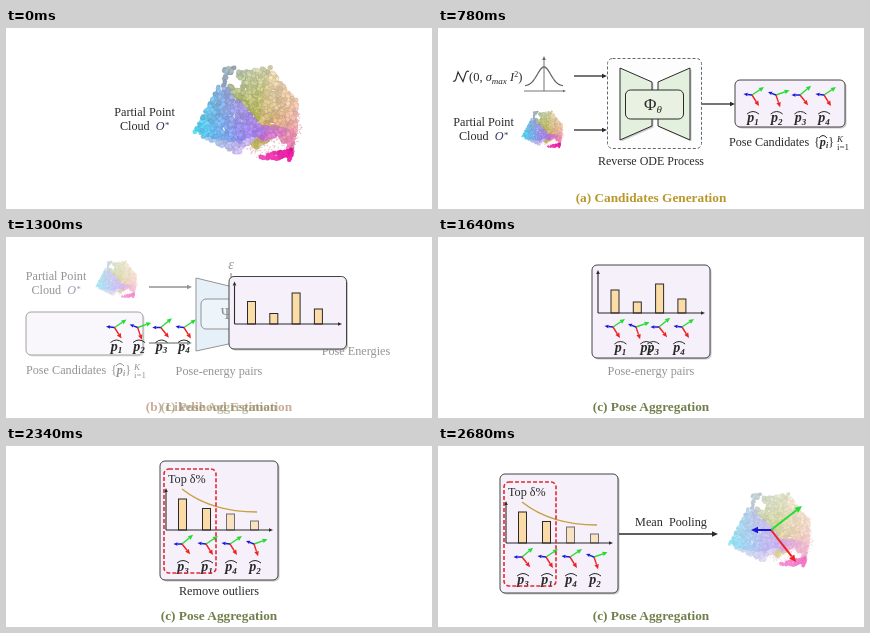
Write an HTML page that moves like this. It is 426 px wide and 181 px high and loops after 2780 ms.

```html
<!DOCTYPE html>
<html lang="en">
<head>
<meta charset="utf-8">
<title>Pose estimation pipeline</title>
<style>
  html, body { margin: 0; width: 100%; height: 100%; overflow: hidden; background: #fff; }
  svg { display: block; width: 100vw; height: 100vh; font: 12.2px "Liberation Serif", "Times New Roman", serif; }
</style>
</head>
<body>
<svg viewBox="0 0 426 181">
  <defs><g id="cloud"></g></defs>
  <g id="scene"></g>
</svg>
<script>
const LOOP = 2780, STEPS = 32;
const INK = '#2a2a2a', PANEL = '#f5f0f9';
const scene = document.getElementById('scene');

const mix = (a, b, t) => a + (b - a) * t;
const mixAll = (a, b, t) => a.map((v, i) => mix(v, b[i], t));
const ease = (k, from, to) => {
  const t = Math.min(1, Math.max(0, (k - from) / (to - from)));
  return t * t * (3 - 2 * t);
};
const startOf = step => 20 * Math.round(step * 13 / 3);

// Drawing helpers, all returning SVG markup
const fade = (opacity, body) => opacity > 0.01 ? `<g opacity="${opacity}">${body}</g>` : '';
const move = (x, y, body) => `<g transform="translate(${x} ${y})">${body}</g>`;
const path = (d, attrs = '', fill = 'none', stroke = INK) => `<path d="${d}" fill="${fill}" stroke="${stroke}" ${attrs}/>`;
const text = (x, y, body, attrs = 'text-anchor="middle"') => `<text x="${x}" y="${y}" fill="${INK}" ${attrs}>${body}</text>`;
const title = (body, color) => `<text x="213" y="174" text-anchor="middle" font-size="13.3" font-weight="bold" fill="${color}">${body}</text>`;
const box = (x, y, w, h, r, attrs) => `<rect x="${x}" y="${y}" width="${w}" height="${h}" rx="${r}" ${attrs}/>`;
const sub = (body, drop = 3, size = 8) => `<tspan dy="${drop}" font-size="${size}">${body}</tspan>`;

function arrow(x1, y1, x2, y2, color = INK, width = 1.3, head = 5) {
  const a = Math.atan2(y2 - y1, x2 - x1), c = Math.cos(a), s = Math.sin(a);
  const bx = x2 - head * c, by = y2 - head * s, r = head * 0.45;
  return `<path d="M${x1} ${y1}L${bx} ${by}" stroke="${color}" stroke-width="${width}"/>` +
    `<path d="M${x2} ${y2}L${bx - r * s} ${by + r * c}L${bx + r * s} ${by - r * c}Z" fill="${color}"/>`;
}

function panel([x, y, w, h]) {
  return box(x + 1.5, y + 1.5, w, h, 5, 'fill="#999" opacity=".55"') +
    box(x, y, w, h, 5, `fill="${PANEL}" stroke="#444"`);
}

const hat = (x, y, w) => path(`M${x - w} ${y}Q${x} ${y - 5} ${x + w} ${y}`);

const poseLabel = (x, y, n) => hat(x, y - 8, 6) +
  text(x, y, `p${sub(n, 2.5, 9)}`, 'text-anchor="middle" font-size="14" font-weight="bold" font-style="italic"');

const triad = (x, y, turn) => `<g transform="translate(${x} ${y}) rotate(${turn})">` +
  arrow(0, 0, 12, -8, '#22dd33', 1.4) + arrow(0, 0, 7, 11, '#ee2222', 1.4) +
  arrow(0, 0, -8.5, -1, '#1818d8', 1.4, 4) + '</g>';

// Point cloud: coloured triangles packed with seeded random beads, centred on (242, 87)
function buildCloud() {
  let seed = 7;
  const random = () => (seed = seed * 16807 % 2147483647) / 2147483647;
  const hex = c => [1, 3, 5].map(i => parseInt(c.slice(i, i + 2), 16));
  const patches = [
    [[230, 44, '#b8c8a8'], [267, 39, '#e0dab0'], [252, 96, '#bcbc48']],
    [[222, 56, '#b0c090'], [250, 70, '#ccc880'], [244, 102, '#a8b038']],
    [[264, 41, '#e6d8ae'], [291, 75, '#f4caac'], [252, 104, '#ccb468']],
    [[291, 71, '#f4ceb0'], [290, 103, '#f2a8b0'], [250, 104, '#cca458']],
    [[236, 104, '#b0b048'], [274, 104, '#e0a890'], [250, 121, '#ccc468']],
    [[270, 103, '#eaa4b8'], [289, 103, '#f098b0'], [286, 127, '#f070b8']],
    [[248, 130, '#ff50c0'], [286, 121, '#f010a0'], [285, 132, '#f420a8']],
    [[196, 108, '#98d0f4'], [252, 106, '#c8a8f4'], [232, 126, '#d4c0f6']],
    [[232, 95, '#a478f0'], [289, 102, '#f088b0'], [258, 112, '#d470d8']],
    [[188, 105, '#48dcf8'], [216, 52, '#94b0dc'], [234, 114, '#9498f6']],
    [[216, 54, '#98b4d8'], [234, 112, '#9890f6'], [260, 104, '#b87cf0']],
    [[218, 41, '#98acb4'], [229, 39, '#a0b0b4'], [218, 56, '#94acc0']]
  ];
  const dot = (x, y, r, attrs) => `<circle cx="${(x - 242).toFixed(1)}" cy="${(y - 87).toFixed(1)}" r="${r}" ${attrs}/>`;
  let out = '';
  for (let i = 0; i < 600; i++) {
    const a = random() * 6.283, d = Math.sqrt(random());
    out += dot(263 + 33 * d * Math.cos(a), 97 + 35 * d * Math.sin(a), 0.7, `fill="hsl(${300 + 90 * random()} 55% 82%)"`);
  }
  for (const corners of patches) {
    const [[x0, y0], [x1, y1], [x2, y2]] = corners;
    const area = Math.abs((x1 - x0) * (y2 - y0) - (x2 - x0) * (y1 - y0)) / 2;
    for (let i = 0; i < area / 4; i++) {
      let u = random(), v = random();
      if (u + v > 1) { u = 1 - u; v = 1 - v; }
      const weights = [1 - u - v, u, v];
      const blend = pick => weights.reduce((sum, w, j) => sum + w * pick(corners[j]), 0);
      const light = 0.92 + 0.18 * random();
      const rgb = [0, 1, 2].map(c => Math.min(255, Math.round(light * blend(p => hex(p[2])[c]))));
      out += dot(blend(p => p[0]), blend(p => p[1]), 2.2, `fill="rgb(${rgb})" stroke="#556" stroke-opacity=".2" stroke-width=".5"`);
    }
  }
  document.getElementById('cloud').innerHTML = out;
}

const cloud = (x, y, scale) => `<use href="#cloud" transform="translate(${x} ${y}) scale(${scale})"/>`;

function inputCloud(toGeneration, toLikelihood) {
  // cloud x, y, scale, label x, label baseline
  let pose = mixAll([242, 87, 1, 138.5, 88], [105, 102, 0.39, 45.5, 98], toGeneration);
  pose = mixAll(pose, [111, 43, 0.39, 50, 43], toLikelihood);
  const [x, y, scale, tx, ty] = pose;
  return cloud(x, y, scale) + text(tx, ty, 'Partial Point') +
    text(tx, ty + 14, `Cloud &#160;<tspan font-style="italic" fill="#336">O${sub('*', -2, 9)}</tspan>`);
}

function generation() {
  const bell = Array.from({ length: 39 }, (_, i) => `${87 + i} ${58 - 19 * Math.exp(-(((i - 19) / 9.5) ** 2))}`).join('L');
  const trapezoid = d => path(d, 'transform="translate(1.5 1.5)" opacity=".4"', '#888', 'none') + path(d, '', '#e4f0de');
  return path('M15 53q2 1 3-2l2-7l5 9.5l3-9q1-2 3-1', 'stroke-width="1.1"') +
    text(31, 53, `(0, <tspan font-style="italic">σ${sub('max', 2.5, 9)}<tspan dy="-2.5"> I</tspan></tspan>${sub('2', -4)}<tspan dy="4">)</tspan>`, 'font-size="12.5"') +
    arrow(86, 63, 128, 63, '#666', 0.9, 3) + arrow(106, 63, 106, 28, '#666', 0.9, 4) +
    path(`M${bell}`, 'stroke-width="1.3"', 'none', '#666') +
    arrow(136, 48, 169, 48) + arrow(136, 102, 169, 102) +
    box(169.5, 30.5, 94, 90, 5, 'fill="#fdfdfd" stroke="#667" stroke-dasharray="3 2"') +
    trapezoid('M182 40L214 54V98L182 112Z') + trapezoid('M252 40L220 54V98L252 112Z') +
    box(187.5, 62, 58, 29, 5, `fill="#e8f1e2" stroke="${INK}"`) +
    text(215, 82, `Φ${sub('<tspan font-style="italic">θ</tspan>', 3, 11)}`, 'text-anchor="middle" font-size="17"') +
    text(213, 137, 'Reverse ODE Process', 'text-anchor="middle" font-size="12"') +
    arrow(264, 76, 297, 76) + title('(a) Candidates Generation', '#b8982c');
}

function likelihood() {
  return arrow(143, 50, 186, 50) + arrow(143, 106, 186, 106) +
    path('M190 41L260 58V99L190 114Z', '', '#cfe2f2') +
    box(195, 62, 60, 30, 5, `fill="#dceaf6" stroke="${INK}"`) +
    text(224, 82, `Ψ${sub('<tspan font-style="italic">φ</tspan>', 3, 11)}`, 'text-anchor="middle" font-size="17"') +
    text(225, 32, 'ε', 'text-anchor="middle" font-style="italic" font-size="14"') + arrow(225, 36, 225, 50, INK, 1.2, 4) +
    arrow(261, 77, 291, 77) + text(350, 118, 'Pose Energies') +
    title('(b) Likelihood Estimation', '#985a35');
}

function candidatePanel(t) {
  const [x, y, w, h, tx, ty] = mixAll([297, 52, 110, 47, 291, 118], [20, 75, 117, 43, 20, 137], t);
  return panel([x, y, w, h]) + text(tx, ty, 'Pose Candidates', '') + hat(tx + 94, ty - 8, 4) +
    text(tx + 85, ty, `{<tspan font-weight="bold" font-style="italic">p${sub('i', 2)}</tspan><tspan dy="-2">}</tspan>`, '') +
    text(tx + 108, ty - 4, 'K', 'font-size="9" font-style="italic"') + text(tx + 108, ty + 4, 'i=1', 'font-size="9"');
}

const TURNS = [0, 14, -6, 0];
const SORTED = [1, 3, 0, 2];
const HEIGHTS = [22, 10, 33, 16], PAIR_HEIGHTS = [23, 11, 29, 14], SORTED_HEIGHTS = [21.5, 9, 31, 16];

function chart(toPairs, toSorted, outlier) {
  let frame = mixAll([292, 51, 117, 52], [154, 28, 118, 93], toPairs);
  frame = mixAll(frame, [154, 15, 118, 119], toSorted);
  let axes = mixAll([297, 98, 56, 405], [160, 76, 33, 267], toPairs);
  axes = mixAll(axes, [160, 84, 42, 267], toSorted);
  const [x, base, top, right] = axes;
  const bars = HEIGHTS.map((height, i) => {
    const h = mix(mix(height, PAIR_HEIGHTS[i], toPairs), SORTED_HEIGHTS[i], toSorted);
    const cx = x + mix(17 + 22.3 * i, 16.5 + 24 * SORTED[i], toSorted);
    const opacity = SORTED[i] > 1 ? 1 - 0.35 * outlier : 1;
    return box(cx - 4, base - h, 8, h, 0, `fill="#fbdca6" stroke="${INK}" opacity="${opacity}"`);
  }).join('');
  return panel(frame) + bars + arrow(x, base, x, top, INK, 1.1, 4) + arrow(x, base, right, base, INK, 1.1, 4);
}

function poses(toLikelihood, toPairs, labelSort, iconSort) {
  return TURNS.map((turn, i) => {
    // icon x, icon y, label x, label baseline
    let at = mixAll([314 + 24 * i, 67, 315 + 23.7 * i, 94], [42 + 23.3 * i, 91, 42 + 23.3 * i, 112], toLikelihood);
    at = mixAll(at, [175 + 23 * i, 90, 179 + 21.7 * i, 115], toPairs);
    const [x, y, labelX, labelY] = at, slotX = 176 + 24 * SORTED[i];
    return triad(mix(x, slotX, iconSort), mix(y, 98, iconSort), turn) +
      poseLabel(mix(labelX, slotX + 1, labelSort), mix(labelY, 125, iconSort), i + 1);
  }).join('');
}

function ranking() {
  return text(162, 37, 'Top δ%', '') + path('M176 43Q205 66 251 66', 'stroke-width="1.4"', 'none', '#c8a040') +
    box(158, 23, 52, 104, 5, 'fill="none" stroke="#e02c34" stroke-width="1.6" stroke-dasharray="4 2"');
}

function pooledPose() {
  return text(233, 80, 'Mean&#160; Pooling') + arrow(181, 88, 280, 88, INK, 1.5, 6) +
    fade(0.6, cloud(333, 85, 0.78)) +
    arrow(333, 84, 364, 60, '#22dd33', 2, 7) + arrow(333, 84, 358, 116, '#ee2222', 2, 7) +
    arrow(333, 84, 313, 84, '#1818d8', 2, 7);
}

function render(k) {
  const toGeneration = ease(k, 5, 7.08), showA = ease(k, 6, 8);
  const toB = ease(k, 10, 12), toC = ease(k, 14, 16);
  const labelSort = ease(k, 18, 22), iconSort = ease(k, 19, 22);
  const ranked = ease(k, 22, 24), slide = ease(k, 28, 30.5), pooled = ease(k, 29, 31);
  scene.innerHTML =
    fade(1 - toC, inputCloud(toGeneration, toB)) +
    fade(showA * (1 - toB), generation()) +
    fade(toB * (1 - toC), likelihood()) +
    fade(showA * (1 - toC), candidatePanel(toB)) +
    move(-92 * slide, 13 * slide,
      fade(toB, chart(toC, iconSort, ranked)) +
      fade(showA, poses(toB, toC, labelSort, iconSort)) +
      fade(ranked, ranking())) +
    fade(toC * (1 - ease(k, 18, 20)), text(213, 138, 'Pose-energy pairs')) +
    fade(ranked * (1 - slide), text(213, 149, 'Remove outliers')) +
    fade(toC, title('(c) Pose Aggregation', '#717f4c')) +
    fade(pooled, pooledPose());
}

let shown = -1;
function tick(now) {
  const t = now % LOOP;
  let step = STEPS - 1;
  while (startOf(step) > t) step--;
  if (step !== shown) render(shown = step);
  requestAnimationFrame(tick);
}

buildCloud();
render(0);
requestAnimationFrame(tick);
</script>
</body>
</html>
```
